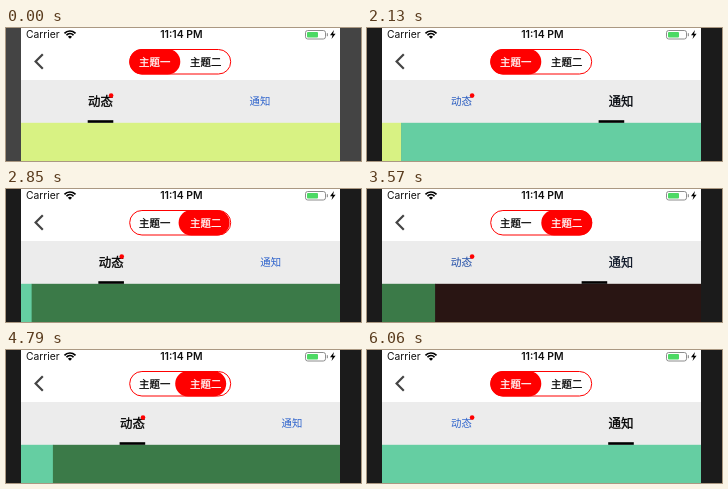
These frames come from a looping animation (355 px wide and 133 px high, 6.36 s). An HTML page with a canvas:

```html
<!DOCTYPE html>
<html lang="zh-CN">
<head>
<meta charset="utf-8">
<title>Nested tabs</title>
<style>
html, body { margin: 0; width: 100%; height: 100%; overflow: hidden; background: #1b1b1b; }
canvas { display: block; width: 355px; height: 133px; }
</style>
</head>
<body>
<canvas id="stage"></canvas>
<script>
const W = 355, H = 133, LOOP = 6360;
const LEFT = 15, PAGE = 319;
const PAGES = ['#d8f283', '#65cea2', '#3b7a48', '#291513'];
const RED = '#ff0000';
const CJK = '"Noto Sans CJK SC", "Noto Sans CJK", sans-serif';
const LATIN = 'Inter, sans-serif';

// Each swipe: a short drag, a pause, then a decelerating settle.
const SWIPES = [
  { from: 0, to: 1, drag: [1610, 1730], settle: [1960, 2250], steps: 6, first: 0.163, held: 0.76 },
  { from: 1, to: 2, drag: [2370, 2490], settle: [2670, 2970], steps: 6, first: 0.16, held: 0.7 },
  { from: 2, to: 3, drag: [3210, 3330], settle: [3570, 3850], steps: 6, first: 0.16, held: 0.76 },
  { from: 3, to: 2, drag: [4090, 4210], settle: [4260, 4490], steps: 5, first: 0.052, held: 0.75 },
  { from: 2, to: 1, drag: [4790, 4910], settle: [5140, 5490], steps: 7, first: 0.1, held: 0.8 }
];

const canvas = document.getElementById('stage');
const ctx = canvas.getContext('2d');
const ratio = window.devicePixelRatio || 1;
canvas.width = Math.round(W * ratio);
canvas.height = Math.round(H * ratio);

const clamp = (v, lo = 0, hi = 1) => Math.min(hi, Math.max(lo, v));
const mix = (a, b, k) => a + (b - a) * k;

// Index of the latest of `count` evenly spaced steps across a time span.
function stepAt(t, [start, end], count) {
  return clamp(Math.floor((t - start) / (end - start) * (count - 1) + 0.03), 0, count - 1);
}

function swipeProgress(t, s) {
  if (t < s.settle[0]) return mix(s.first, s.held, stepAt(t, s.drag, 3) / 2);
  const left = 1 - (stepAt(t, s.settle, s.steps) + 1) / s.steps;
  return 1 - (1 - s.held) * left * left;
}

function positionAt(t) {
  const s = SWIPES.filter(s => t >= s.drag[0]).pop();
  return s ? mix(s.from, s.to, swipeProgress(t, s)) : 0;
}

function rect(x, y, w, h, color) {
  ctx.fillStyle = color;
  ctx.fillRect(x, y, w, h);
}

function roundRect(x, y, w, h, r) {
  ctx.beginPath();
  ctx.roundRect(x, y, w, h, r);
}

function polyline(points) {
  ctx.beginPath();
  points.forEach(([x, y]) => ctx.lineTo(x, y));
}

function cjkText(text, x, y, size, color, bold) {
  ctx.font = `500 ${size}px ${CJK}`;
  ctx.textAlign = 'center';
  ctx.fillStyle = ctx.strokeStyle = color;
  const base = y + size * 0.38;
  ctx.fillText(text, x, base);
  if (bold > 0) {
    ctx.lineWidth = bold;
    ctx.strokeText(text, x, base);
  }
}

function drawStatusBar() {
  ctx.fillStyle = '#111';
  ctx.textAlign = 'left';
  ctx.font = `400 10.3px ${LATIN}`;
  ctx.fillText('Carrier', 20, 10.3);
  ctx.textAlign = 'center';
  ctx.font = `600 10.4px ${LATIN}`;
  ctx.fillText('11:14 PM', 175.3, 10.3);

  // Wi-Fi
  ctx.strokeStyle = '#000';
  ctx.lineWidth = 1.7;
  for (const r of [7.6, 4.9]) {
    ctx.beginPath();
    ctx.arc(64, 10.6, r, -Math.PI * 0.76, -Math.PI * 0.24);
    ctx.stroke();
  }
  ctx.beginPath();
  ctx.moveTo(64, 10.8);
  ctx.arc(64, 10.8, 2.9, -Math.PI * 0.76, -Math.PI * 0.24);
  ctx.fillStyle = '#000';
  ctx.fill();

  // Battery
  ctx.strokeStyle = '#8c8c8c';
  ctx.lineWidth = 1;
  roundRect(299.5, 2.5, 20, 8.5, 2.2);
  ctx.stroke();
  roundRect(301, 4, 11, 5.5, 1);
  ctx.fillStyle = '#4cd964';
  ctx.fill();
  rect(320.8, 5.2, 1.1, 3, '#8c8c8c');

  polyline([[328, 2], [324, 7.2], [326.5, 7.2], [325.5, 11], [329.6, 5.8], [327.1, 5.8]]);
  ctx.fillStyle = '#000';
  ctx.fill();
}

function drawThemeLabels(color) {
  cjkText('主题一', 148.7, 33.6, 10.4, color, 0.25);
  cjkText('主题二', 199.7, 33.6, 10.4, color, 0.25);
}

function drawHeader(theme) {
  rect(LEFT, 0, PAGE, 52, '#fff');
  drawStatusBar();

  ctx.strokeStyle = '#444';
  ctx.lineWidth = 2.2;
  polyline([[36.8, 26.3], [29.6, 33.5], [36.8, 40.7]]);
  ctx.stroke();

  drawThemeLabels('#000');
  ctx.strokeStyle = RED;
  ctx.lineWidth = 1;
  roundRect(123.7, 21.5, 101, 24.5, 12.2);
  ctx.stroke();

  // The pill also masks the white labels.
  ctx.save();
  roundRect(123.3 + theme * 51, 21, 51, 25.4, 12.7);
  ctx.fillStyle = RED;
  ctx.fill();
  ctx.clip();
  drawThemeLabels('#fff');
  ctx.restore();
}

function drawTab(text, x, selected) {
  const color = `rgb(${[47, 100, 204].map(c => Math.round(c * (1 - selected))).join()})`;
  cjkText(text, x, 73.3, mix(10.4, 12.5, selected), color, 0.3 * selected);
}

function drawTabs(shift, inner) {
  const first = 94.5 + shift, second = first + PAGE / 2;
  drawTab('动态', first, 1 - inner);
  drawTab('通知', second, inner);
  ctx.beginPath();
  ctx.arc(first + 10.6, 67.6, 2.3, 0, Math.PI * 2);
  ctx.fillStyle = RED;
  ctx.fill();
  rect(mix(first, second, inner) - 12.8, 92.2, 25.6, 2.6, '#000');
}

function draw(t) {
  const pos = positionAt(t);
  const theme = clamp(pos - 1);
  ctx.setTransform(ratio, 0, 0, ratio, 0, 0);
  rect(0, 0, W, H, t < SWIPES[0].drag[0] ? '#444' : '#1b1b1b');

  ctx.save();
  ctx.beginPath();
  ctx.rect(LEFT, 0, PAGE, H);
  ctx.clip();
  drawHeader(theme);
  rect(LEFT, 52, PAGE, 43, '#ececec');
  PAGES.forEach((color, i) => rect(LEFT + (i - pos) * PAGE, 94.8, PAGE + 0.5, H - 94.8, color));
  drawTabs(-theme * PAGE, clamp(pos));
  drawTabs((1 - theme) * PAGE, clamp(pos - 2));
  ctx.restore();
}

const start = performance.now();
function frame() {
  draw((performance.now() - start) % LOOP);
  requestAnimationFrame(frame);
}
frame();
</script>
</body>
</html>
```
